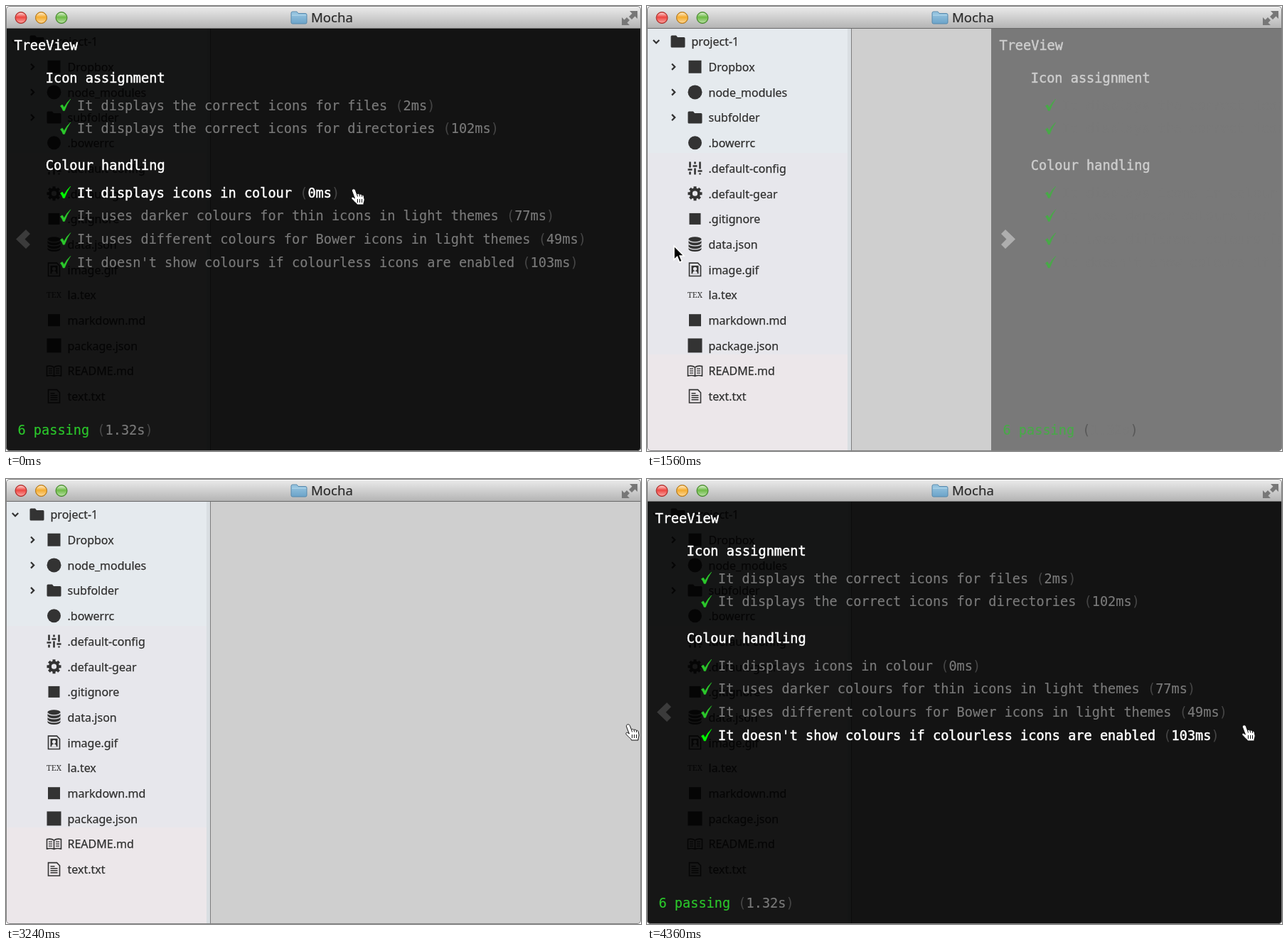
Animation, 893 px wide and 627 px high, one loop 4.5 s. Source, as an HTML page:

```html
<!DOCTYPE html>
<html lang="en">
<head>
<meta charset="utf-8">
<title>Mocha</title>
<style>
  html, body { margin: 0; width: 100%; height: 100%; overflow: hidden; background: #fff; }
  svg { display: block; width: 893px; height: 627px; }
  text { white-space: pre; }
  .title { font: 18.6px "Noto Sans", sans-serif; fill: #2c2c2c; stroke: #2c2c2c; stroke-width: .2; }
  .tree { font: 16px "Noto Sans", sans-serif; }
  .name { fill: #2f2f2f; stroke: #2f2f2f; stroke-width: .25; }
  .tex { font: 11px "Noto Serif", serif; fill: #333; }
  .report { font: 18.58px "DejaVu Sans Mono", monospace; }
  .report .head { fill: #fff; stroke: #fff; stroke-width: .5; }
  .report .row { fill: #7a7a7a; stroke: #7a7a7a; stroke-width: .15; }
  .report .paren { fill: #454545; stroke: none; }
  .report .tick { fill: #2bc82b; stroke: #2bc82b; stroke-width: .5; }
  .report .hover .row { fill: #fff; stroke: #fff; stroke-width: .5; }
  .report .hover .tick { fill: #0f0; stroke: #0f0; }
  .line { fill: none; stroke: #333; stroke-width: 1.6; }
</style>
</head>
<body>
<svg viewBox="0 0 893 627">
  <defs>
    <linearGradient id="bar" x2="0" y2="1">
      <stop stop-color="#ededed"/><stop offset="1" stop-color="#b4b4b4"/>
    </linearGradient>
    <linearGradient id="gloss" x2="0" y2="1">
      <stop stop-color="#fff" stop-opacity=".75"/><stop offset=".45" stop-color="#fff" stop-opacity="0"/>
      <stop offset="1" stop-color="#fff" stop-opacity=".5"/>
    </linearGradient>
    <linearGradient id="blue" x2="0" y2="1">
      <stop stop-color="#9bc8e2"/><stop offset="1" stop-color="#6ba3c9"/>
    </linearGradient>
    <clipPath id="window"><rect width="893" height="627" rx="5"/></clipPath>
    <clipPath id="body"><rect y="32" width="893" height="595"/></clipPath>
    <path id="tick" d="M76.4 140.8 L79.2 139 Q80.8 140.8 81.6 143 Q85.5 135.5 90.8 131 Q85.8 138 82.4 147.6 L80.2 147.6 Q79 143.8 76.4 140.8Z"/>
    <path id="folder" d="M-10 -7 Q-10 -8.5 -8.5 -8.5 H-2.5 L-.5 -6 H8.5 Q10 -6 10 -4.5 V7 Q10 8.5 8.5 8.5 H-8.5 Q-10 8.5 -10 7Z"/>
  </defs>
  <g clip-path="url(#window)">
    <rect width="893" height="627" fill="#cfcfcf"/>
    <rect y="32" width="287" height="175" fill="#e5eaee"/>
    <rect y="207" width="287" height="284" fill="#e7e7ec"/>
    <rect y="491" width="287" height="136" fill="#ece7ea"/>
    <rect x="282" y="32" width="5" height="595" fill="#d9dee2"/>
    <rect x="287" y="32" width="1" height="595" fill="#7d7d7d"/>
    <g id="tree" class="tree"></g>
    <g clip-path="url(#body)">
      <g id="pane">
        <rect id="shade" y="32" width="893" height="595"/>
        <path id="chevron" fill="#fff" d="M28 315 L34 321 L26.5 328.5 L34 336 L28 342 L14 328.5Z"/>
        <g id="report" class="report"></g>
      </g>
    </g>
    <rect width="893" height="31" fill="url(#bar)"/>
    <rect y="1" width="893" height="1" fill="#fafafa"/>
    <rect y="31" width="893" height="1" fill="#696969"/>
    <g id="buttons"></g>
    <path d="M401 10 q0-2 2-2 h6 l2 2.5 h10 q2 0 2 2 V23 q0 2-2 2 h-18 q-2 0-2-2Z" fill="url(#blue)" stroke="#5689ad"/>
    <path d="M402 13 H422" stroke="#b9dcee"/>
    <text class="title" x="429" y="23">Mocha</text>
    <path fill="#777" d="M877 7 H888 V18 L884.5 14.5 L880 19 L876 15 L880.5 10.5Z M866 16 L869.5 19.5 L873 16 L877 20 L873.5 23.5 L877 27 H866Z"/>
    <rect x=".5" y=".5" width="892" height="626" rx="4.5" fill="none" stroke="#808080"/>
    <g id="arrow">
      <path d="M0 0 V19.5 L4.5 15.3 L7.7 23 L11.3 21.5 L8.1 14 H14Z" stroke="#fff" stroke-width="1.5"/>
    </g>
    <g id="hand" stroke="#111">
      <path fill="#fff" d="M2.5 1.2 C4 .2 5.8 1 6.4 2.6 L8.6 8.4 C9.2 7.2 11.4 7.2 12 8.6 C13 7.6 14.8 8 15.3 9.4 C16.6 8.8 18 9.8 18.3 11.2 L19.2 16 C19.2 18 18 19.4 18 21 V23 H8.6 L8 21.5 C6 20 4 17.5 1.4 15 C0 13.4 1.6 11.6 3.4 12.4 L5.4 14 L1.6 4 C1.2 2.8 1.4 1.8 2.5 1.2Z"/>
      <path d="M9.5 15 V20 M12.5 15 V20 M15.5 15 V20 M8.6 8.4 L9.6 11.5 M12 8.6 L12.8 11.5 M15.3 9.4 L15.8 12"/>
    </g>
  </g>
</svg>
<script>
const $ = id => document.getElementById(id);
const LOOP = 4500, STEP = 140, WIDTH = 893, SLIDE = 289;
const CLOSE_AT = 1469, OPEN_AT = 3482;

// Icons are drawn around their own centre.
const square = s => `<rect x="${-s / 2}" y="${-s / 2}" width="${s}" height="${s}" fill="#333"/>`;
const circle = r => `<circle r="${r}" fill="#333"/>`;
const folder = '<use href="#folder" fill="#333"/>';
const sliders = [-7, 0, 7].map((x, i) => {
  const y = [2, -3, 4][i];
  return `<path class="line" style="stroke-width:2.6" d="M${x} -9 V${y - 3} M${x} ${y + 3} V9 M${x - 3} ${y} h6"/>`;
}).join('');
const gear = '<circle r="5.6" class="line" style="stroke-width:4"/>' + [0, 45, 90, 135].map(a =>
  `<path transform="rotate(${a})" stroke="#333" stroke-width="4" d="M0 -10 V-6 M0 6 V10"/>`).join('');
const database = '<path fill="#333" d="M-9 -7 A9 3.3 0 0 1 9 -7 V7 A9 3.3 0 0 1 -9 7Z"/>' + [-5, 0, 5].map(y =>
  `<path d="M-9 ${y - 1} A9 3.3 0 0 0 9 ${y - 1}" fill="none" stroke="#e7e7ec" stroke-width="1.4"/>`).join('');
const sheet = '<path class="line" d="M-8 -9.2 H4 L8 -5 V9.2 H-8Z"/>';
const picture = sheet + '<path fill="#333" d="M-5 -5.5 H5 V6 H-5Z"/>' +
  '<path fill="#e7e7ec" d="M-3.5 6 Q-3 2 0 2 Q3 2 3.5 6Z"/><circle cy="-1" r="2.6" fill="#e7e7ec"/>';
const tex = '<text class="tex" text-anchor="middle" y="4">TEX</text>';
const book = '<path class="line" d="M0 -5 Q-4 -8 -10 -6.5 V7 Q-4 5.5 0 7.5 Q4 5.5 10 7 V-6.5 Q4 -8 0 -5 V7"/>' +
  '<path class="line" style="stroke-width:1.2" d="M-7.5 -3 h5 m-5 3 h5 m-5 3 h5 M2.5 -3 h5 m-5 3 h5 m-5 3 h5"/>';
const note = sheet + '<path class="line" d="M-5 -4 h6 M-5 -1 h10 m-10 3 h10 m-10 3 h10"/>';

const files = [
  ['project-1', folder], ['Dropbox', square(18)], ['node_modules', circle(10)], ['subfolder', folder],
  ['.bowerrc', circle(9.5)], ['.default-config', sliders], ['.default-gear', gear], ['.gitignore', square(16)],
  ['data.json', database], ['image.gif', picture], ['la.tex', tex], ['markdown.md', square(17)],
  ['package.json', square(20)], ['README.md', book], ['text.txt', note]
];
const treeLine = ([name, icon], i) => {
  const y = 50.5 + 35.7 * i, x = i ? 67.5 : 43.5;
  const twist = i > 3 ? '' : `<path class="line" style="stroke-width:2.2" transform="translate(${i ? 37 : 13} ${y - .5}) rotate(${i ? 0 : 90})" d="M-2 -4.2 L2.2 0 L-2 4.2"/>`;
  const label = x + 19;
  return twist + `<g transform="translate(${x} ${y - .5})">${icon}</g>` +
    `<text x="${label}" y="${y + 6.8}" fill="#fff" opacity=".6">${name}</text>` +
    `<text class="name" x="${label}" y="${y + 5.8}">${name}</text>`;
};
$('tree').innerHTML = files.map(treeLine).join('');

const timing = value => `<tspan class="paren">(</tspan>${value}<tspan class="paren">)</tspan>`;
const head = (x, y, label) => `<text class="head" x="${x}" y="${y}">${label}</text>`;
const test = (y, label, ms) => `<g class="test"><use class="tick" href="#tick" y="${y - 146.5}"/>` +
  `<text class="row" x="100" y="${y}">${label} ${timing(ms + 'ms')}</text></g>`;
$('report').innerHTML =
  head(11.5, 62, 'TreeView') +
  head(55.8, 108, 'Icon assignment') +
  test(146.5, 'It displays the correct icons for files', 2) +
  test(179.4, 'It displays the correct icons for directories', 102) +
  head(55.8, 231, 'Colour handling') +
  test(269.5, 'It displays icons in colour', 0) +
  test(302.3, 'It uses darker colours for thin icons in light themes', 77) +
  test(335.1, 'It uses different colours for Bower icons in light themes', 49) +
  test(367.9, "It doesn't show colours if colourless icons are enabled", 103) +
  `<text class="row" x="16.5" y="603.5"><tspan fill="#2bc82b" stroke="#2bc82b">6 passing</tspan> ${timing('1.32s')}</text>`;
const tests = [...document.querySelectorAll('.test')];

$('buttons').innerHTML = [[21, '#ee4540', '#9c2b28'], [49.5, '#f5ac2e', '#a8701c'], [78, '#6dbb45', '#3f7d2b']]
  .map(([x, fill, rim]) => `<circle cx="${x}" cy="16.5" r="8" fill="${fill}" stroke="${rim}"/>` +
    `<circle cx="${x}" cy="16.5" r="7" fill="url(#gloss)"/>`).join('');

// [time, x, y] of the pointer's top left corner
const route = [
  [0, 485, 257], [160, 478, 260], [300, 435, 268], [440, 320, 290], [580, 165, 300], [720, 48, 334],
  [860, 32, 342], [1280, 32, 342], [1420, 33, 341], [1560, 38, 338], [2260, 38, 338], [2400, 110, 350],
  [2540, 440, 360], [2680, 760, 357], [2820, 842, 353], [2960, 866, 348], [3100, 871, 345],
  [3520, 871, 345], [3660, 867, 345], [3800, 846, 346], [3940, 836, 346], [LOOP, 836, 346]
];
function pointerAt(t) {
  const i = Math.max(1, route.findIndex(p => p[0] >= t));
  const [t0, x0, y0] = route[i - 1], [t1, x1, y1] = route[i];
  const u = (t - t0) / (t1 - t0);
  return [x0 + (x1 - x0) * u, y0 + (y1 - y0) * u];
}

// The standard "ease" curve, solved by bisection.
function ease(u) {
  if (u <= 0 || u >= 1) return u <= 0 ? 0 : 1;
  let lo = 0, hi = 1;
  for (let i = 0; i < 24; i++) {
    const s = (lo + hi) / 2;
    if (.75 * s * (1 - s) + s ** 3 < u) lo = s; else hi = s;
  }
  return .3 * lo * (1 - lo) ** 2 + 3 * lo * lo * (1 - lo) + lo ** 3;
}

function hoveredTest(t) {
  if (t <= 300) return 2;
  if (t <= 580) return 3;
  return t >= 3800 ? 5 : -1;
}

function render(time) {
  const t = time < 160 ? 0 : 20 + STEP * Math.floor((time - 20) / STEP);
  const opening = t >= OPEN_AT;
  const shown = opening ? ease((t - OPEN_AT) / SLIDE) : 1 - ease((t - CLOSE_AT) / SLIDE);
  const collapsed = t >= CLOSE_AT && !opening;

  $('pane').setAttribute('transform', `translate(${Math.round(WIDTH * (1 - shown))} 0)`);
  $('shade').setAttribute('fill-opacity', .905 * shown);
  $('report').setAttribute('opacity', shown ** (opening ? 1.5 : .6));
  $('chevron').setAttribute('transform', collapsed ? 'translate(48 0) scale(-1 1)' : '');
  $('chevron').setAttribute('opacity', t >= 860 && t < 3800 ? .4 : .16);

  const active = hoveredTest(t);
  tests.forEach((g, i) => g.classList.toggle('hover', i === active));

  const [x, y] = pointerAt(t);
  const isArrow = collapsed && x < 860;
  for (const id of ['arrow', 'hand']) {
    $(id).setAttribute('transform', `translate(${x} ${y})`);
    $(id).setAttribute('visibility', isArrow === (id === 'arrow') ? 'visible' : 'hidden');
  }
}

const start = performance.now();
function tick() {
  render((performance.now() - start) % LOOP);
  requestAnimationFrame(tick);
}
tick();
</script>
</body>
</html>
```
